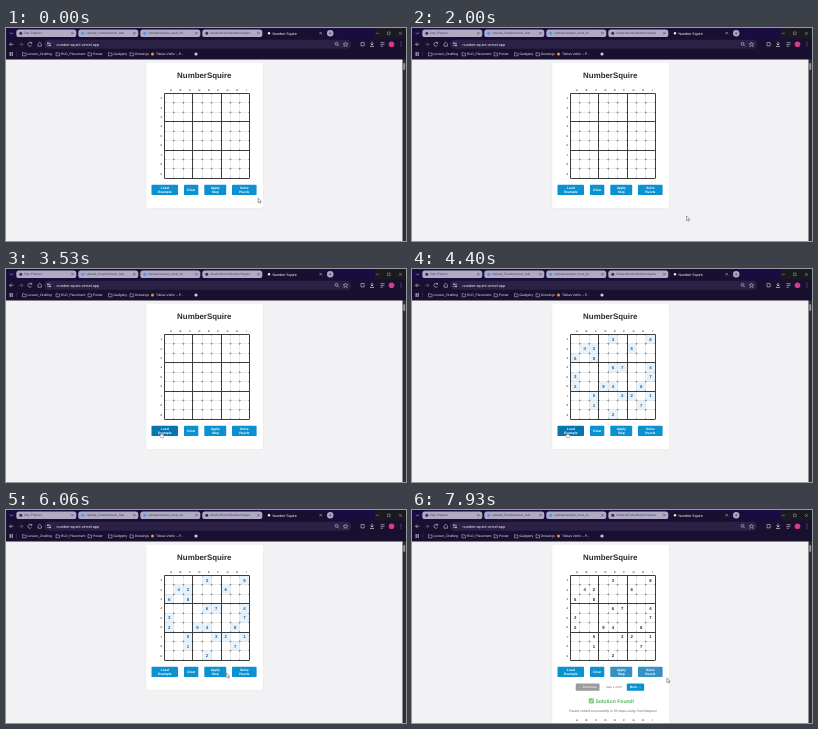
Animation, 400 px wide and 213 px high, one loop 8000 ms. Source, as an HTML page:

```html
<!DOCTYPE html>
<html lang="en">
<head>
<meta charset="utf-8">
<title>Number Squire</title>
<style>
html, body { margin: 0; width: 100%; height: 100%; overflow: hidden; background: #f2f2f4; }
svg { display: block; width: 100vw; height: 100vh; }
text { font-family: "Liberation Sans", Arial, sans-serif; text-rendering: geometricPrecision; }
</style>
</head>
<body>
<svg id="stage" viewBox="0 0 400 213" preserveAspectRatio="none"></svg>
<script>
const BLUE = '#0c91d0', HOVER = '#0874ac', MUTED = '#3590c4', CHROME = '#191030', PALE = '#cfc9de', TAB = '#aeabc2';
const GRID = { x: 158.5, y: 65.5, cell: 9.42 };
const PUZZLE = [
  '....3...8', '.42...6..', '6.8......',
  '....67..4', '3.......7', '2..94..8.',
  '..5..32.1', '..1....7.', '....2....'
];

const rect = (x, y, w, h, fill, r = 0, extra = '') =>
  `<rect x="${x}" y="${y}" width="${w}" height="${h}" rx="${r}" fill="${fill}" ${extra}/>`;
const text = (x, y, label, size, fill, anchor = 'middle', weight = 400, style = 'normal') =>
  `<text x="${x}" y="${y}" font-size="${size}" fill="${fill}" text-anchor="${anchor}" font-weight="${weight}" font-style="${style}">${label}</text>`;
const bold = (x, y, label, size, fill) => text(x, y, label, size, fill, 'middle', 700);
const line = (d, color, width = 0.6, extra = '') =>
  `<path d="${d}" fill="none" stroke="${color}" stroke-width="${width}" ${extra}/>`;
const dot = (x, y, r, fill) => `<circle cx="${x}" cy="${y}" r="${r}" fill="${fill}"/>`;
const group = (id, body) => `<g id="${id}">${body}</g>`;

function browser() {
  const tabs = [
    ['Day Planner', '#39314f'], ['Update_Readme/new_feat', '#5a8ff0'],
    ['Update/sample_tests_br', '#5a8ff0'], ['StudentCode/NumberSquire', '#39314f']
  ];
  const bookmarks = [
    [21.5, 'Lesson_Drafting'], [55, 'RLD_Placement'], [87, 'Poster'],
    [107.5, 'Gadgetry'], [129, 'Drawings']
  ];
  let s = rect(0, 0, 400, 31.5, CHROME) + rect(0, 0, 400, 10.5, '#1a0b40') + rect(369, 0, 31, 10.5, '#1b1a20');
  s += line('M4 4.6l1.5 1.5l1.5-1.5', PALE);
  tabs.forEach(([label, color], i) => {
    const x = 10.3 + i * 62;
    s += rect(x, 1.4, 60, 7.6, TAB, 2.6) + dot(x + 4.5, 5.2, 1.5, color)
      + text(x + 8, 6.4, label, 3.2, '#4a4262', 'start')
      + line(`M${x + 55} 4.1l2.2 2.2m0-2.2l-2.2 2.2`, '#40355a', 0.5);
  });
  s += rect(258, 1.3, 62, 9.7, CHROME, 2.2) + dot(263, 5.2, 1.2, '#eee')
    + text(266.5, 6.5, 'Number Squire', 3.6, '#fff', 'start')
    + line('M313.5 4l2.4 2.4m0-2.4l-2.4 2.4', PALE, 0.5)
    + dot(324.2, 5.3, 3.2, TAB) + line('M324.2 3.7v3.2m-1.6-1.6h3.2', '#40355a', 0.5)
    + line('M369.8 5.3h3M381.5 4h2.6v2.6h-2.6zM393 4l2.8 2.8m0-2.8l-2.8 2.8', '#aaa', 0.5);

  s += rect(38, 11.8, 307, 9, '#2b2144', 4.5)
    + line('M7.5 16.3h-4m1.8-1.8l-1.8 1.8l1.8 1.8', PALE)
    + line('M13 16.3h4m-1.8-1.8l1.8 1.8l-1.8 1.8', '#776d8c')
    + line('M25.5 15a2 2 0 1 0 .1 2.4M25.7 13.8v1.5h-1.5', PALE)
    + line('M32 18.2v-2.4l1.7-1.6l1.7 1.6v2.4z', PALE)
    + line('M41 15.2h4M41 17.4h4', PALE) + dot(42, 15.2, 0.8, PALE) + dot(44, 17.4, 0.8, PALE)
    + text(50.5, 17.6, 'number-squire.vercel.app', 3.75, '#f2eef8', 'start')
    + `<circle cx="330.5" cy="15.8" r="1.4" fill="none" stroke="${PALE}" stroke-width=".6"/>`
    + line('M331.5 16.8l1.4 1.4', PALE)
    + line('M339.5 14l.7 1.6l1.7.1l-1.3 1.1l.5 1.7l-1.6-1l-1.6 1l.5-1.7l-1.3-1.1l1.7-.1z', PALE, 0.5)
    + line('M355 14.5h3.2v3.4h-3.2z', PALE)
    + line('M366 13.7v3.2m-1.4-1.3l1.4 1.4l1.4-1.4M364 18.4h4', '#fff')
    + line('M374.5 14.6h4M374.5 16.4h4M374.5 18.2h2.5', PALE)
    + dot(385.5, 16.2, 2.8, '#d63b86')
    + [14.3, 16.2, 18.1].map(y => dot(395, y, 0.45, PALE)).join('');

  for (let i = 0; i < 4; i++) s += rect(3.5 + i % 2 * 2, 24.3 + (i >> 1) * 2, 1.4, 1.4, PALE);
  s += line('M10.5 23.5v5', '#514566', 0.4);
  for (const [x, label] of bookmarks)
    s += line(`M${x - 5} 24.6h1.3l.5.6h1.8v2.6h-3.6z`, PALE, 0.5)
      + text(x, 27.2, label, 3.35, '#eee9f5', 'start');
  return s + dot(146.5, 26, 1.5, '#e39a2d')
    + text(150, 27.2, 'Tobias Verlin – P...', 3.35, '#eee9f5', 'start') + dot(190, 26, 1.6, PALE);
}

const letters = y => [...'ABCDEFGHI'].map((c, i) =>
  bold(GRID.x + (i + 0.7) * GRID.cell, y, c, 2.7, '#55404f')).join('');

// Lines sit on whole pixels; thin ones are darker where they cross.
function gridLines() {
  const { x, y, cell } = GRID, size = cell * 9;
  const snap = v => Math.floor(v) + 0.5;
  let thin = '', thick = '';
  for (let i = 0; i <= 9; i++) {
    const d = `M${snap(x + i * cell)} ${y}v${size}M${x} ${snap(y + i * cell)}h${size}`;
    if (i % 3) thin += d; else thick += d;
  }
  return line(thin, '#dcdcdc')
    + line(thin, '#8c8c8c', 0.8, `stroke-dasharray="2 ${cell - 2}" stroke-dashoffset="1"`)
    + line(thick, '#333', 0.95);
}

function eachGiven(draw) {
  let s = '';
  PUZZLE.forEach((row, r) => [...row].forEach((digit, c) => {
    if (digit !== '.') s += draw(GRID.x + c * GRID.cell, GRID.y + r * GRID.cell, digit);
  }));
  return s;
}

const buttons = [
  [145.5, 26.5, 'Load', 'Example'], [178, 14.3, 'Clear'],
  [198.3, 21.9, 'Apply', 'Step'], [226, 24.6, 'Solve', 'Puzzle']
];
const tallButtons = buttons.map(([x, w, first, second]) => {
  const mid = x + w / 2;
  return rect(x, 156.7, w, 10.4, BLUE, 0.9, 'class="button"')
    + (second ? bold(mid, 161.2, first, 3.3, '#fff') + bold(mid, 165.3, second, 3.3, '#fff')
              : bold(mid, 163.1, first, 3.3, '#fff'));
}).join('');
const busyButtons = [
  [146.6, 27.8, 'Load Example', BLUE], [180.3, 14.2, 'Clear', BLUE],
  [200.3, 22.8, 'Applying...', MUTED], [228.8, 20.6, 'Solving...', '#2480b8']
].map(([x, w, label, fill]) => rect(x, 156.7, w, 6.9, fill, 0.9)
  + bold(x + w / 2, 161.3, label, 3.3, '#fff')).join('');

const solution = rect(163.7, 173.6, 23.8, 7.2, '#9b9b9b', 0.9)
  + bold(175.6, 178.4, '← Previous', 3.3, '#eee')
  + text(201.8, 178.3, 'Step 1 of 56', 2.9, '#666')
  + rect(214.8, 173.6, 17.4, 7.2, BLUE, 0.9)
  + bold(223.5, 178.4, 'Next →', 3.3, '#fff')
  + rect(176.7, 188.2, 5.2, 5.2, '#7ccb84', 0.8) + line('M177.9 190.8l1.2 1.3l1.8-2.7', '#fff', 0.7)
  + text(183.4, 192.8, 'Solution Found!', 5.1, '#52b858', 'start', 700)
  + text(200.8, 201.6, 'Puzzle solved successfully in 56 steps using 3 techniques!', 3.4, '#666', 'middle', 400, 'italic')
  + letters(211);

const stage = document.getElementById('stage');
stage.innerHTML = rect(0, 31, 400, 182, '#f2f2f4')
  + rect(139.6, 35.4, 118, 145.2, '#e9e9ec', 2, 'class="card"')
  + rect(140.2, 35, 116.8, 145, '#fff', 1.8, 'class="card"')
  + bold(198.3, 49.7, 'NumberSquire', 7.9, '#2b2b2b')
  + letters(62.8)
  + PUZZLE.map((_, i) => bold(155.2, GRID.y + (i + 0.6) * GRID.cell, i + 1, 2.7, '#444')).join('')
  + group('tint', eachGiven((x, y) => rect(x, y, GRID.cell, GRID.cell, '#e6f3fc')))
  + gridLines()
  + group('digits', eachGiven((x, y, d) =>
      text(x + GRID.cell / 2, y + 6.3, d, 4.3, 'inherit', 'middle', 700)).replaceAll('fill="inherit" ', ''))
  + group('ready', tallButtons) + group('busy', busyButtons) + group('solved', solution)
  + rect(396.5, 31, 3.5, 182, '#303034') + rect(397.2, 35, 2, 7, '#8f8f94', 1)
  + browser()
  + group('cursor',
    '<path id="arrow" d="M0 0v4.6l1.1-.9l.8 1.7l.8-.4l-.8-1.6h1.5z" fill="#fff" stroke="#444" stroke-width=".45"/>'
    + '<path id="hand" d="M-.5 .3q.5-.6 1 0v2l2 .5q.6.2.4 1l-.5 2h-2.6l-1.7-2.2q.2-.7 1.4 0z" fill="#fff" stroke="#444" stroke-width=".4"/>');

const $ = id => document.getElementById(id);
const cards = document.querySelectorAll('.card'), buttonFaces = document.querySelectorAll('.button');
const show = (id, on) => $(id).setAttribute('visibility', on ? 'visible' : 'hidden');

// Pointer stops: time, x, y
const PATH = [
  [0, 252, 170], [120, 252, 170], [800, 274.5, 188], [2660, 274.5, 188], [2850, 271, 190.5],
  [3500, 155, 163], [5360, 155, 163], [6000, 220.6, 163], [6200, 220.6, 163],
  [6550, 228, 166.5], [6900, 236.8, 160], [7350, 236.8, 160], [7800, 254.8, 167.8], [8000, 254.8, 167.8]
];
function pointer(t) {
  const i = Math.max(1, PATH.findIndex(stop => stop[0] >= t));
  const [t0, x0, y0] = PATH[i - 1], [t1, x1, y1] = PATH[i];
  const p = Math.max(0, (t - t0) / (t1 - t0)), e = p * p * (3 - 2 * p);
  return [x0 + (x1 - x0) * e, y0 + (y1 - y0) * e];
}
const inside = ([x, y], left, width) => x > left && x < left + width && y > 156.7 && y < 167.1;

function render(t) {
  const filled = t >= 4000, busy = t >= 7060 && t < 7860, solved = t >= 7860;
  show('tint', filled && !busy && !solved);
  show('digits', filled);
  $('digits').setAttribute('fill', busy || solved ? '#24303c' : '#2b5f8a');
  show('ready', !busy);
  show('busy', busy);
  show('solved', solved);
  cards.forEach(card => card.setAttribute('height', solved ? 185 : busy ? 141.2 : 145));

  const tip = pointer(t), settled = pointer(Math.max(0, t - 150));
  buttons.forEach(([x, w], i) => {
    const hovered = inside(tip, x, w) && inside(settled, x, w);
    buttonFaces[i].setAttribute('fill', hovered ? HOVER : solved && i > 1 ? MUTED : BLUE);
  });
  const over = buttons.some(([x, w]) => inside(tip, x, w));
  show('hand', over);
  show('arrow', !over);
  $('cursor').setAttribute('transform', `translate(${tip})`);
}

const start = performance.now();
function frame() {
  render((performance.now() - start) % 8000);
  requestAnimationFrame(frame);
}
frame();
</script>
</body>
</html>
```
